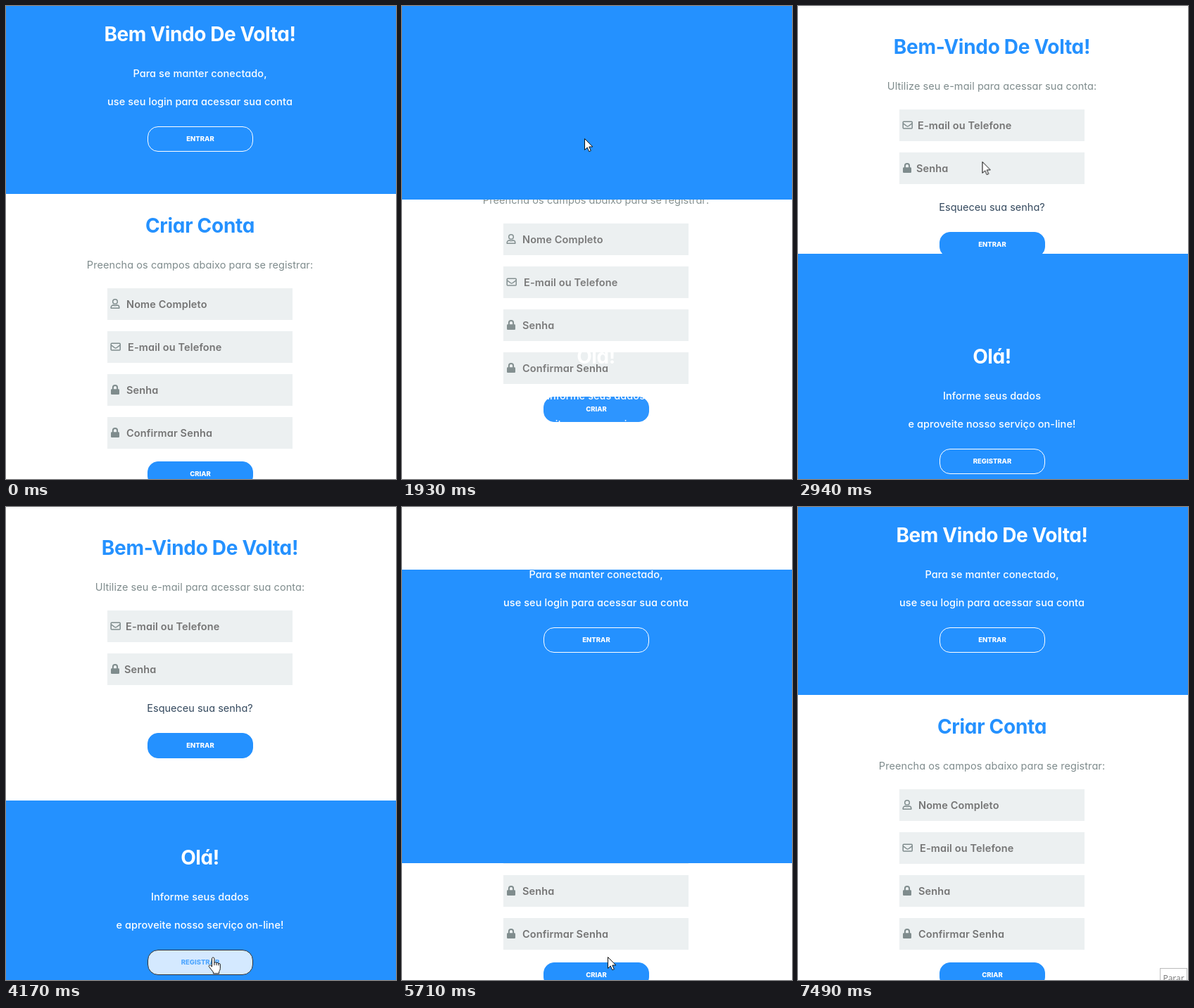
An HTML page that plays this animation: 554 by 672 pixels, repeating every 7.55 s.

```html
<!DOCTYPE html>
<html lang="pt-BR">
<head>
<meta charset="utf-8">
<title>Login e cadastro</title>
<style>
  :root { --blue: #2491ff; --gray: #7f8c8d; --loop: 7550ms; }
  html, body { margin: 0; width: 100%; height: 100%; overflow: hidden; background: #fff; }
  body { position: relative; font-family: Inter, "Open Sans", sans-serif; font-feature-settings: "cv11"; }
  .stage { position: absolute; inset: 0 auto auto 0; width: 554px; height: 672px; overflow: hidden; background: #fff; }
  .stage::before { content: ""; position: absolute; width: 100%; height: 3px; background: #fafafa; }
  .layer { position: absolute; inset: 0; }
  svg { position: absolute; overflow: visible; }

  /* --y is the vertical centre of each line of text */
  h2, p { position: absolute; left: 0; top: calc(var(--y) * 1px - 20px); width: 551px; margin: 0;
    line-height: 40px; text-align: center; white-space: nowrap; }
  h2 { font-size: 28px; font-weight: 700; letter-spacing: -.3px; color: var(--blue); }
  p { font-size: 14.5px; letter-spacing: .07px; color: var(--gray); }
  .welcome h2 { letter-spacing: -.4px; color: #fff; }
  .welcome p { font-weight: 500; color: #fff; }
  p.link { color: #34495e; letter-spacing: 0; }

  .field { position: absolute; left: 144px; top: calc(var(--y) * 1px); width: 263px; height: 45px;
    box-sizing: border-box; padding-left: var(--x); background: #ecf0f1; color: #757575;
    font-size: 14.5px; font-weight: 600; letter-spacing: .13px; line-height: 45px; white-space: nowrap; }
  .field svg { left: 4px; top: 15px; width: 16px; height: 16px; fill: none; stroke: var(--gray); stroke-width: 1.5; }

  .button { position: absolute; left: 201px; top: calc(var(--y) * 1px); width: 150px; height: 36px;
    box-sizing: border-box; border: 1px solid var(--blue); border-radius: 15px; background: var(--blue);
    color: #fff; font-size: 9.5px; font-weight: 800; line-height: 34px; text-align: center; }
  .welcome .button { border-color: #fff; background: #fff0; }

  .panel { position: absolute; left: 0; width: 100%; background: var(--blue); animation: slide var(--loop) infinite; }
  .sign-up { animation: sign-up var(--loop) step-end infinite; }
  .sign-in { animation: sign-in var(--loop) step-end infinite; }
  .back { animation: back var(--loop) step-end infinite; }
  .hello { animation: hello var(--loop) step-end infinite; }
  .back .button { animation: hover-enter var(--loop) infinite; }
  .hello .button { animation: hover-register var(--loop) infinite; }
  .cursor { position: absolute; left: 0; top: 0; animation: move var(--loop) linear infinite, present var(--loop) step-end infinite; }
  .cursor svg { left: 0; top: 0; fill: #fff; stroke: #111; stroke-width: 1; stroke-linejoin: round; }
  .arrow { animation: arrow var(--loop) step-end infinite; }
  .hand { animation: hand var(--loop) step-end infinite; }
  .tip { position: absolute; left: 514px; top: 655px; width: 39px; height: 30px; box-sizing: border-box;
    border: 1px solid #bbb; background: #fff; color: #777; font: 12px/28px "Open Sans", sans-serif;
    text-align: center; animation: tip var(--loop) step-end infinite; }

  @keyframes slide {
    0%, 25.232% { top: -33px; height: 300px; }
    29.444% { top: 4.5px; height: 375px; }
    33.656% { top: 154.5px; height: 450px; }
    37.868% { top: 304.5px; height: 375px; }
    42.079%, 66.106% { top: 417px; height: 300px; }
    70.318% { top: 304.5px; height: 375px; }
    74.53% { top: 154.5px; height: 450px; }
    78.742% { top: 4.5px; height: 375px; }
    82.954%, 100% { top: -33px; height: 300px; }
  }
  @keyframes sign-up {
    0% { opacity: 1; transform: none; }
    25.232% { opacity: 1; transform: translateY(-92px); animation-timing-function: linear; }
    33.656% { opacity: 0; transform: translateY(-92px); }
    71%, 100% { opacity: 1; transform: none; }
  }
  @keyframes sign-in {
    0% { opacity: 0; transform: none; }
    29.444% { opacity: 1; transform: none; }
    66.106% { opacity: 1; transform: translateY(92px); }
    74.53%, 100% { opacity: 0; transform: none; }
  }
  @keyframes back {
    0% { opacity: 1; }
    25.232% { opacity: 0; }
    66.106%, 100% { opacity: 1; }
  }
  @keyframes hello {
    0% { opacity: 0; }
    25.232% { opacity: 1; }
    66.106%, 100% { opacity: 0; }
  }
  @keyframes hover-enter {
    0%, 14.04% { background: #fff0; border-color: #fff; color: #fff; }
    20.66%, 30% { background: #fff; border-color: #000; color: var(--blue); }
    31%, 100% { background: #fff0; border-color: #fff; color: #fff; }
  }
  @keyframes hover-register {
    0%, 51.92% { background: #fff0; border-color: #fff; color: #fff; }
    58.54%, 70% { background: #fff; border-color: #000; color: var(--blue); }
    71%, 100% { background: #fff0; border-color: #fff; color: #fff; }
  }
  @keyframes move {
    0%, 2.78% { transform: translate(485px, 622px); }
    12.05% { transform: translate(282px, 239px); }
    14.04% { transform: translate(268px, 206px); }
    16.2%, 38.41% { transform: translate(259px, 188px); }
    41.06% { transform: translate(271px, 348px); }
    41.99% { transform: translate(272px, 411px); }
    46.36% { transform: translate(282px, 530px); }
    50.33% { transform: translate(291px, 628px); }
    51.92%, 77.48% { transform: translate(292px, 639px); }
    79.74% { transform: translate(292px, 631px); }
    82.78% { transform: translate(322px, 616px); }
    85.83% { transform: translate(390px, 612px); }
    90.86%, 100% { transform: translate(486px, 674px); }
  }
  @keyframes present {
    0% { opacity: 0; }
    2.78% { opacity: 1; }
    90.8%, 100% { opacity: 0; }
  }
  @keyframes arrow {
    0% { opacity: 1; }
    14.04% { opacity: 0; }
    25.232% { opacity: 1; }
    51.92% { opacity: 0; }
    66.106%, 100% { opacity: 1; }
  }
  @keyframes hand {
    0% { opacity: 0; }
    14.04% { opacity: 1; }
    25.232% { opacity: 0; }
    51.92% { opacity: 1; }
    66.106%, 100% { opacity: 0; }
  }
  @keyframes tip {
    0% { opacity: 0; }
    96.95% { opacity: .35; }
    98.1% { opacity: .7; }
    99.15%, 100% { opacity: 1; }
  }
</style>
</head>
<body>
<svg width="0" height="0">
  <symbol id="user" viewBox="0 0 16 16" overflow="visible">
    <circle cx="7" cy="4" r="3.3"/>
    <path d="M1.2 13.3v-1.1a3.2 3.2 0 0 1 3.2-3.2q2.6 1 5.2 0a3.2 3.2 0 0 1 3.2 3.2v1.1z" stroke-linejoin="round"/>
  </symbol>
  <symbol id="mail" viewBox="0 0 16 16" overflow="visible">
    <rect x="1.2" y="2.2" width="13" height="9.8" rx="1"/>
    <path d="M1.4 4.8l4.9 3.7q1.4 1 2.8 0l4.9-3.7"/>
  </symbol>
  <symbol id="lock" viewBox="0 0 16 16" overflow="visible">
    <rect x="1" y="6.2" width="12" height="7.8" rx="1.2" fill="#7f8c8d" stroke="none"/>
    <path d="M3.9 7V4.2a3.1 3.1 0 0 1 6.2 0V7" stroke-width="2"/>
  </symbol>
</svg>

<main class="stage">
  <section class="layer sign-up">
    <h2 style="--y:312">Criar Conta</h2>
    <p style="--y:368">Preencha os campos abaixo para se registrar:</p>
    <div class="field" style="--y:401;--x:27px"><svg><use href="#user"/></svg>Nome Completo</div>
    <div class="field" style="--y:462;--x:29px"><svg><use href="#mail"/></svg>E-mail ou Telefone</div>
    <div class="field" style="--y:523;--x:27px"><svg><use href="#lock"/></svg>Senha</div>
    <div class="field" style="--y:584;--x:27px"><svg><use href="#lock"/></svg>Confirmar Senha</div>
    <div class="button" style="--y:647">CRIAR</div>
  </section>

  <section class="layer sign-in">
    <h2 style="--y:58">Bem-Vindo De Volta!</h2>
    <p style="--y:114">Ultilize seu e-mail para acessar sua conta:</p>
    <div class="field" style="--y:147;--x:26px"><svg><use href="#mail"/></svg>E-mail ou Telefone</div>
    <div class="field" style="--y:208;--x:24px"><svg><use href="#lock"/></svg>Senha</div>
    <p class="link" style="--y:286">Esqueceu sua senha?</p>
    <div class="button" style="--y:321">ENTRAR</div>
  </section>

  <div class="panel"></div>

  <section class="layer welcome back">
    <h2 style="--y:40">Bem Vindo De Volta!</h2>
    <p style="--y:96">Para se manter conectado,</p>
    <p style="--y:136">use seu login para acessar sua conta</p>
    <div class="button" style="--y:171">ENTRAR</div>
  </section>

  <section class="layer welcome hello">
    <h2 style="--y:498">Olá!</h2>
    <p style="--y:554">Informe seus dados</p>
    <p style="--y:594">e aproveite nosso serviço on-line!</p>
    <div class="button" style="--y:629">REGISTRAR</div>
  </section>

  <div class="tip">Parar</div>

  <div class="cursor">
    <svg class="arrow" width="13" height="20"><path d="M.5 .5v16l3.7-3.5 2.5 5.7 2.6-1.1-2.5-5.6h5z"/></svg>
    <svg class="hand" width="18" height="26">
      <path d="M.5 2.8c0-2.4 3.4-2.4 3.4 0v6c.3-1.5 3-1.3 3.1.4.5-1.3 2.8-1 2.9.7.6-1 2.4-.6 2.4 1v5.6c0 2.5-1.3 3.6-1.7 5v2.3H2.4v-2c-1.6-2-3.6-4.6-5.6-7.1-1.6-2 .3-3.6 2-2.3L.5 14z"/>
      <path d="M3.9 8.8v3.4M7 9.2v3M9.9 9.9v2.5" fill="none"/>
    </svg>
  </div>
</main>
</body>
</html>
```
